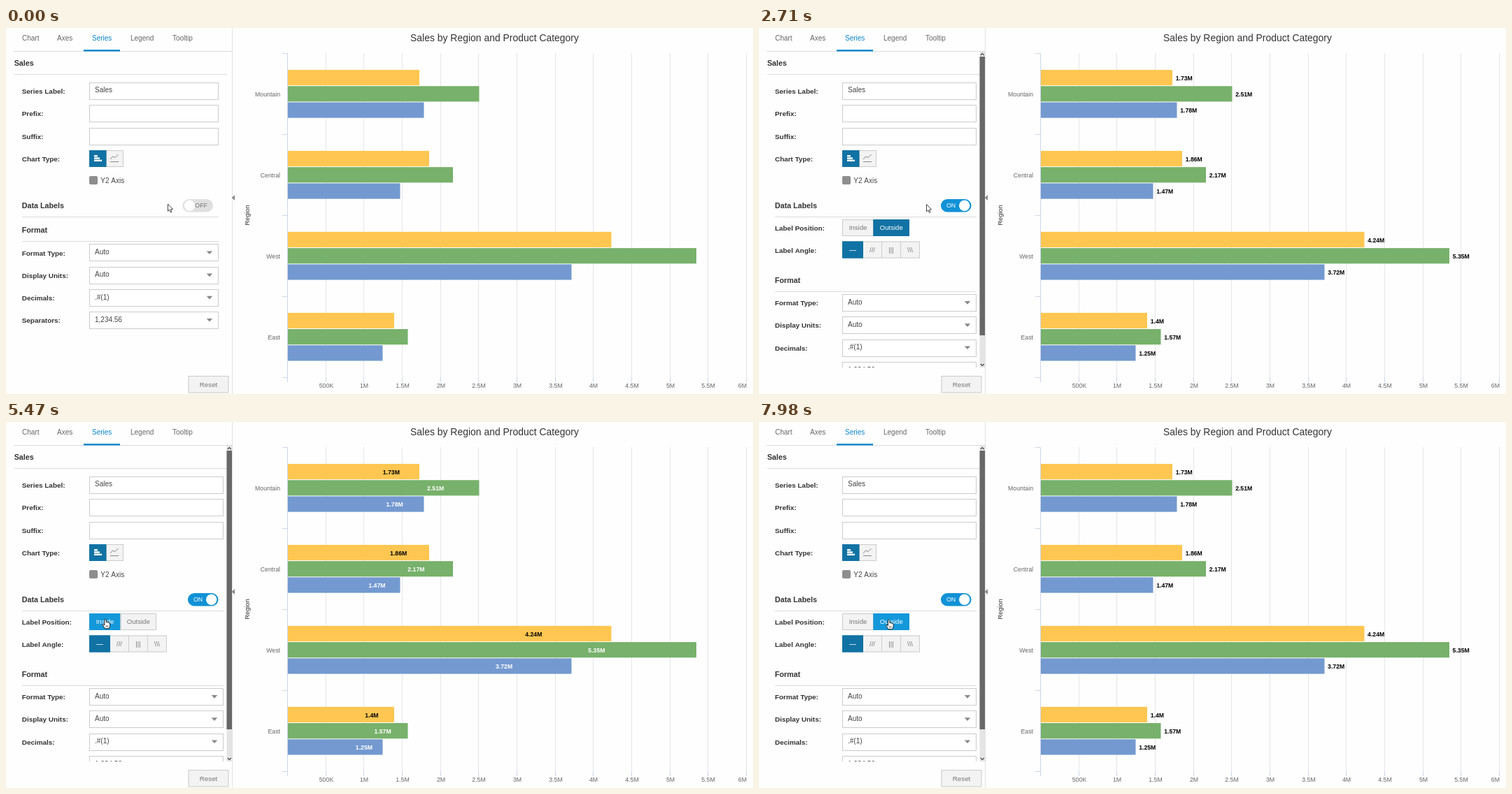
An HTML page with a canvas that plays this animation: 1068x524 px, repeating every 8 s.

```html
<!DOCTYPE html>
<html lang="en">
<head>
<meta charset="utf-8">
<title>Chart label settings</title>
<style>
html, body { margin: 0; width: 100%; height: 100%; overflow: hidden; background: #fefefe; }
canvas { display: block; }
</style>
</head>
<body>
<canvas id="stage" width="1068" height="524"></canvas>
<script>
const ctx = document.getElementById('stage').getContext('2d');
const LOOP = 8000;
const FONT = '"Liberation Sans", Arial, sans-serif';
const INK = '#333', GRAY = '#666', RULE = '#dcdcdc', EDGE = '#ccc', SOFT = '#f3f3f3';
const DARK = '#1172a4', BLUE = '#1398da', AXIS = '#ccd6eb';

const LEFT = 403, UNIT = 109.3;
const COLORS = ['#ffc751', '#77b16b', '#7399d0'];
const REGIONS = [
  { name: 'Mountain', ends: [591, 676.5, 597.5], values: [1.73, 2.51, 1.78] },
  { name: 'Central', ends: [605, 639, 563.5], values: [1.86, 2.17, 1.47] },
  { name: 'West', ends: [865.5, 987, 808.5], values: [4.24, 5.35, 3.72] },
  { name: 'East', ends: [555, 574.5, 538.5], values: [1.4, 1.57, 1.25] }
];

// Pointer moves: start, end, steps, from, to
const MOVES = [
  [770, 1000, 4, [239, 251], [270, 251]],
  [2710, 3500, 11, [239, 252], [156, 255]],
  [3580, 3740, 3, [154, 258], [148, 265]],
  [3890, 4130, 4, [147, 268], [142, 282]],
  [6560, 6800, 4, [149, 283], [185.5, 283]]
];

function rect(x, y, w, h, fill) {
  ctx.fillStyle = fill;
  ctx.fillRect(x, y, w, h);
}

function box(x, y, w, h, fill, edge) {
  rect(x, y, w, h, fill);
  ctx.strokeStyle = edge;
  ctx.lineWidth = 1;
  ctx.strokeRect(x + 0.5, y + 0.5, w - 1, h - 1);
}

function text(str, x, y, size, color, align = 'left', weight = 'normal') {
  ctx.font = `${weight} ${size}px ${FONT}`;
  ctx.textAlign = align;
  ctx.fillStyle = color;
  ctx.fillText(str, x, y + size * 0.36);
}

function shape(points, fill, edge) {
  ctx.beginPath();
  points.forEach(([x, y]) => ctx.lineTo(x, y));
  ctx.closePath();
  if (fill) { ctx.fillStyle = fill; ctx.fill(); }
  if (edge) { ctx.strokeStyle = edge; ctx.stroke(); }
}

function disc(x, y, r, fill) {
  ctx.beginPath();
  ctx.arc(x, y, r, 0, Math.PI * 2);
  ctx.fillStyle = fill;
  ctx.fill();
}

function pointerAt(t) {
  let pos = [231, 251.5];
  for (const [start, end, steps, from, to] of MOVES) {
    if (t < start) break;
    const step = Math.min(steps - 1, Math.floor((t - start) / (end - start) * (steps - 1) + 0.01));
    const k = step / (steps - 1);
    pos = from.map((v, i) => v + (to[i] - v) * k);
  }
  return pos;
}

// Sine ease in 80 ms ticks; the slide begins just after the click lands
function slide(t, click) {
  if (t < click) return 0;
  const elapsed = Math.floor((t - click) / 80 + 0.01) * 80 - 62;
  const x = Math.max(0, Math.min(1, elapsed / 505));
  return (1 - Math.cos(Math.PI * x)) / 2;
}

function drawChart(t) {
  text('Sales by Region and Product Category', 698.5, 14, 13.95, INK, 'center');
  for (let i = 1; i <= 12; i++) {
    const x = Math.round(LEFT + i * UNIT / 2) - 0.5;
    rect(x - 0.5, 36, 1, 465, '#e6e6e9');
    rect(x - 0.5, 500, 1, 7, AXIS);
    const label = i === 1 ? '500K' : i / 2 + 'M';
    if (i === 12) text(label, 1059, 511.5, 8.8, GRAY, 'right');
    else text(label, x + 0.5, 511.5, 8.8, GRAY, 'center');
  }
  REGIONS.forEach(({ name, ends }, r) => {
    const mid = 94.4 + r * 115.95;
    ends.forEach((end, i) => {
      rect(LEFT, mid + (i - 1) * 23.25 - 11.2, end - LEFT, 22.2, COLORS[i]);
    });
    text(name, 392, mid + 0.5, 8.75, GRAY, 'right');
  });
  rect(402, 36, 1, 471, AXIS);
  for (let i = 0; i < 5; i++) rect(395, Math.round(36 + i * 116), 8, 1, AXIS);

  ctx.save();
  ctx.translate(345, 268);
  ctx.rotate(-Math.PI / 2);
  text('Region', 0, 0, 9.2, INK, 'center');
  ctx.restore();

  if (t >= 1620) drawValues(t);
}

function drawValues(t) {
  const inside = t >= 5150 && t < 7420;
  const out = t < 5150 ? 1 : inside ? 1 - slide(t, 5150) : slide(t, 7420);
  REGIONS.forEach(({ ends, values }, r) => {
    ends.forEach((end, i) => {
      const label = values[i] + 'M';
      ctx.font = `bold 8.7px ${FONT}`;
      const far = end + 4.7 + ctx.measureText(label).width / 2;
      const near = (LEFT + end) / 2 + 0.6;
      const y = 94.8 + r * 115.95 + (i - 1) * 23.25;
      text(label, near + (far - near) * out, y, 8.7, inside && i ? '#fff' : '#000', 'center', 'bold');
    });
  });
}

function drawTabs() {
  const tabs = { Chart: 23, Axes: 73, Series: 123, Legend: 178, Tooltip: 238 };
  for (const name in tabs) text(name, tabs[name], 14, 10, name === 'Series' ? '#0b86c8' : GRAY);
  rect(11, 33, 312, 1, RULE);
  rect(111, 31, 52, 2.5, '#128cce');
  rect(323, 0, 1, 524, '#e2e2e2');
  shape([[327, 239], [327, 247], [322.8, 243]], '#888');
}

function drawToggle(on) {
  const x = on ? 260 : 252.5;
  ctx.beginPath();
  ctx.roundRect(x, 245, 43.5, 18.5, 9.25);
  ctx.fillStyle = on ? '#1191d6' : '#e0e0e0';
  ctx.fill();
  disc(on ? 293.7 : 262.5, 254.2, 7.7, '#fff');
  if (on) text('ON', 268, 254, 8.8, '#fff');
  else text('OFF', 270.3, 254, 8.8, '#777');
}

function button(label, x, y, w, h, fill, size = 9.6) {
  const plain = fill[1] === 'f' || fill[1] === 'e';
  box(x, y, w, h, fill, plain ? EDGE : fill);
  text(label, x + w / 2, y + h / 2 - 0.2, size, plain ? '#777' : '#fff', 'center');
}

function drawTypeIcons() {
  box(143, 175, 25, 24, SOFT, EDGE);
  rect(119, 175, 24.5, 24, DARK);
  [5, 8, 11].forEach((w, i) => rect(126, 182 + i * 3.3, w, 2.4, '#fff'));
  ctx.strokeStyle = '#888';
  ctx.lineWidth = 1;
  ctx.beginPath();
  [[149, 188], [152.5, 184], [156, 185.5], [160.5, 181]].forEach(([x, y]) => ctx.lineTo(x, y));
  ctx.moveTo(149, 191.5);
  ctx.lineTo(161, 191.5);
  ctx.stroke();
}

function drawLabelOptions(t, px) {
  const hovered = px >= 164;
  let inside = t >= 4130 ? '#eaeaea' : SOFT;
  if (t >= 4910) inside = '#128ccb';
  if (t >= 4990) inside = hovered ? DARK : BLUE;
  if (t >= 7420) inside = SOFT;
  let outside = DARK;
  if (t >= 5150) outside = t >= 6560 && hovered ? '#eaeaea' : SOFT;
  if (t >= 7180) outside = BLUE;

  text('Label Position:', 22.7, 286.5, 9.95, INK, 'left', 'bold');
  button('Inside', 119, 274, 45, 24, inside);
  button('Outside', 163.5, 274, 51.5, 24, outside);
  text('Label Angle:', 22.7, 318, 9.95, INK, 'left', 'bold');
  ['///', '|||', '\\\\\\'].forEach((s, i) => button(s, 148 + i * 27, 305.5, 28, 24, SOFT, 9.5));
  button('—', 119, 305.5, 30, 24, DARK, 10);
}

function drawFormat(right, shift) {
  text('Format', 22.7, 289 + shift, 10.75, INK, 'left', 'bold');
  rect(23, Math.round(305 + shift), right - 23, 1, RULE);
  const rows = [['Format Type:', 'Auto'], ['Display Units:', 'Auto'], ['Decimals:', '.#(1)'], ['Separators:', '1,234.56']];
  rows.forEach(([name, value], i) => {
    const y = 322 + shift + i * 32.2;
    text(name, 22.7, y, 9.95, INK, 'left', 'bold');
    box(119, Math.round(y - 12.6), right - 119, 25, '#fff', EDGE);
    text(value, 127, y - 1.4, 10, '#444');
    const x = right - 13;
    shape([[x - 4.2, y - 2.6], [x + 4.2, y - 2.6], [x, y + 2]], '#888');
  });
}

function drawScrollbar() {
  rect(315.5, 34, 7.5, 452, '#e4e4e4');
  rect(315.5, 41, 7.5, 399, '#686868');
  ctx.lineWidth = 1.2;
  ctx.strokeStyle = '#444';
  [[39, -2.5], [481, 2.5]].forEach(([y, d]) => {
    ctx.beginPath();
    ctx.moveTo(316.8, y);
    ctx.lineTo(319.3, y + d);
    ctx.lineTo(321.8, y);
    ctx.stroke();
  });
}

function drawPanel(t, px) {
  const open = t >= 1620;
  const right = open ? 311 : 304;
  drawTabs();
  ctx.save();
  ctx.beginPath();
  ctx.rect(0, 34, 323, open ? 452 : 462);
  ctx.clip();
  text('Sales', 11.7, 50, 10.75, INK, 'left', 'bold');
  rect(12, 66, 304, 1, RULE);
  ['Series Label:', 'Prefix:', 'Suffix:', 'Chart Type:'].forEach((name, i) => {
    const y = 90.6 + i * 32.2;
    text(name, 22.7, y, 9.95, INK, 'left', 'bold');
    if (i < 3) box(119, Math.round(y - 12.5), right - 119, 25, '#fff', EDGE);
  });
  text('Sales', 127, 88.5, 10, '#444');
  drawTypeIcons();
  ctx.beginPath();
  ctx.roundRect(119, 212, 12, 12, 2);
  ctx.fillStyle = '#8e8e8e';
  ctx.fill();
  text('Y2 Axis', 135.3, 218.5, 10, '#444');
  text('Data Labels', 22.7, 254, 10.75, INK, 'left', 'bold');
  rect(23, 270, right - 23, 1, RULE);
  drawToggle(t >= 1540);
  if (open) drawLabelOptions(t, px);
  drawFormat(right, open ? 71.7 : 0);
  if (open) drawScrollbar();
  ctx.restore();
  button('Reset', 260.5, 498, 58, 24.5, SOFT, 9.8);
}

function drawPointer(x, y) {
  const hand = (x >= 253 && y < 264) || y >= 274;
  ctx.save();
  ctx.translate(x, y);
  ctx.lineWidth = 1;
  ctx.lineJoin = 'round';
  if (hand) {
    shape([[-1, 1], [0.2, 0.4], [1.3, 1.2], [1.4, 4.6], [3.2, 4.6], [4.6, 5.2], [6.3, 6], [6.7, 7.3],
      [6.4, 10.5], [5.3, 13.8], [-0.6, 13.8], [-2, 11.2], [-4, 8.4], [-3.4, 7.3], [-1.1, 8.7]], '#fff', '#222');
    ctx.beginPath();
    [1.2, 3.3].forEach(v => { ctx.moveTo(v, 9); ctx.lineTo(v, 12); });
    ctx.lineWidth = 0.7;
    ctx.stroke();
  } else {
    shape([[0.5, 0.5], [0.5, 10.8], [2.8, 8.7], [4.4, 12.4], [6, 11.7], [4.4, 8.1], [7.5, 7.8]], '#fff', '#444');
  }
  ctx.restore();
}

function draw(t) {
  const [px, py] = pointerAt(t);
  rect(0, 0, 1068, 524, '#fefefe');
  drawChart(t);
  drawPanel(t, px);
  const clicking = [[1230, 1460], [4910, 5150], [7180, 7420]].some(([a, b]) => t >= a && t < b);
  if (clicking) disc(px - 0.3, py + 0.5, 9.5, 'rgba(130, 200, 60, 0.8)');
  drawPointer(px, py);
}

function frame() {
  draw(performance.now() % LOOP);
  requestAnimationFrame(frame);
}
frame();
</script>
</body>
</html>
```
